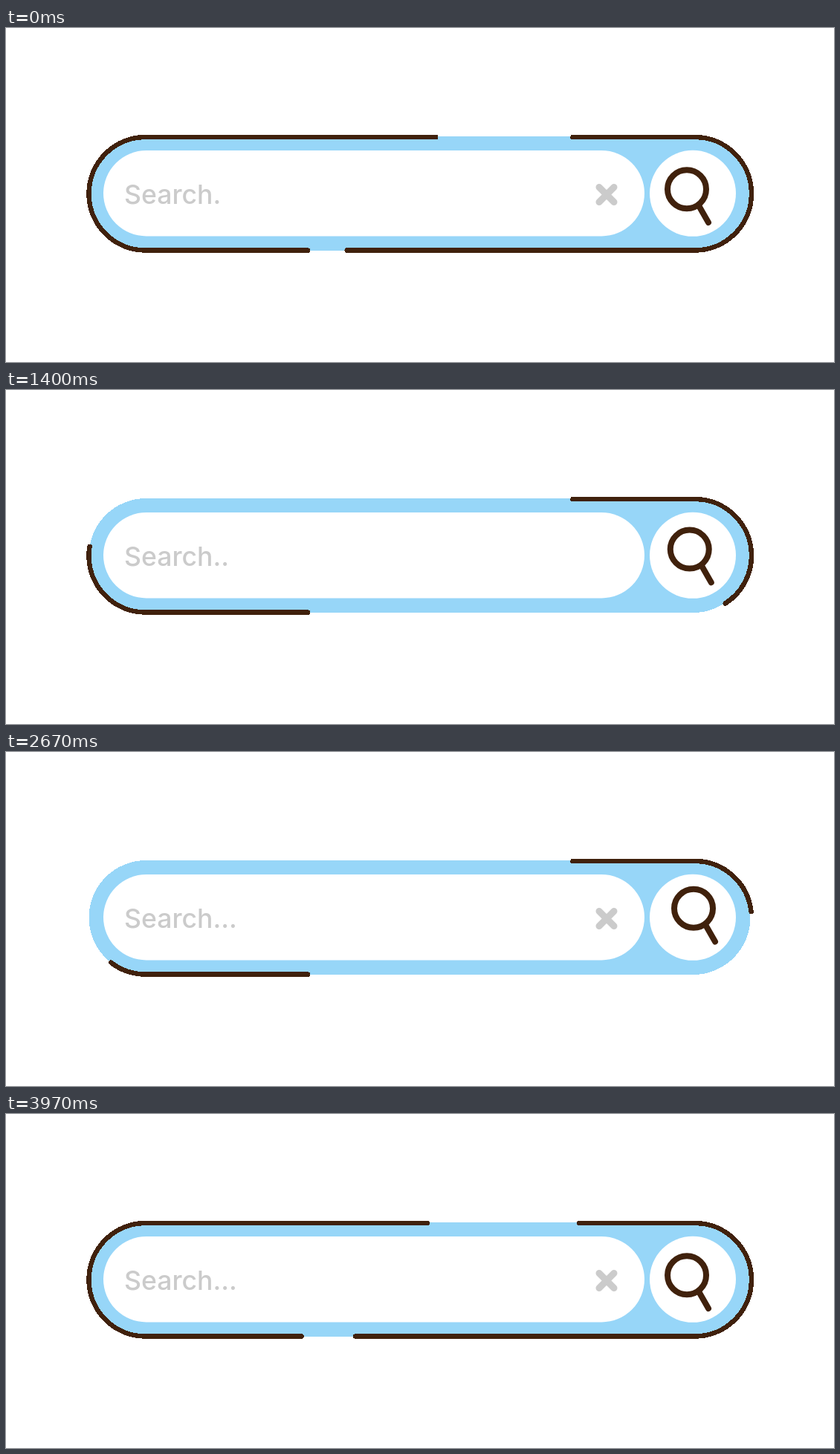
Recreate the animation shown at these times as an HTML page. Size 1114 px wide and 450 px high, loop 4010 ms.

```html
<!DOCTYPE html>
<html lang="en">
<head>
<meta charset="utf-8">
<title>Search bar</title>
<style>
  html, body { margin: 0; height: 100%; overflow: hidden; background: #fff; }
  svg { display: block; }
  text { font: 500 35.6px Inter, sans-serif; fill: #cbcbcb; }
  .ink { fill: none; stroke: #40210c; stroke-linecap: round; }
  .crisp { shape-rendering: crispEdges; }
</style>
</head>
<body>
<svg width="1114" height="450" viewBox="0 0 1114 450">
  <rect class="crisp" x="111.5" y="146" width="890" height="154" rx="77" fill="#97d6f8"/>
  <rect x="131" y="165" width="728" height="115.5" rx="57.75" fill="#fff"/>
  <circle cx="924" cy="222.8" r="58" fill="#fff"/>
  <text id="label" x="159" y="237"></text>
  <path id="cross" d="M798 214.5l20 20m0-20l-20 20" stroke="#cbcbcb" stroke-width="9" stroke-linecap="round"/>
  <g id="lens" class="ink">
    <circle cx="916" cy="217.3" r="26" stroke-width="8"/>
    <path d="M933 241L945 262" stroke-width="8"/>
  </g>
  <g class="ink crisp" stroke-width="6.5">
    <path id="right" d="M762.5 147H926.75a76.25 76.25 0 0 1 0 152.5H400"/>
    <path id="left" d="M406 299.5H187.75a76.25 76.25 0 0 1 0-152.5H700"/>
  </g>
</svg>
<script>
const LOOP = 4010, FRAME = 100 / 3, LAST = 119;
const LEFT_SCALE = 0.973; // the left line is slightly shorter
const get = id => document.getElementById(id);
const label = get('label'), cross = get('cross'), lens = get('lens');
const right = get('right'), left = get('left');

// Progress from 0 to 1 between times a and b, plain and eased
const ramp = (a, b, t) => Math.max(0, Math.min(1, (t - a) / (b - a)));
const smooth = (a, b, t) => {
  const u = ramp(a, b, t);
  return u * u * (3 - 2 * u);
};
const cubic = (a, b, t) => {
  const u = ramp(a, b, t);
  return u < 0.5 ? 4 * u ** 3 : 1 - 4 * (1 - u) ** 3;
};

// Both ends of an outline line, in px along its path
const lineEnd = t => 871.5 - 828.5 * cubic(458, 2194, t) + 817 * cubic(1900, 3750, t);
const lineStart = t =>
  14 * (smooth(1450, 2250, t) - smooth(2250, 2650, t)) + 8.5 * smooth(2950, 3650, t);

const lensShift = t => 9.3 * (smooth(550, 2500, t) - ramp(2400, 3970, t) ** 2);

function trim(path, start, end) {
  path.setAttribute('stroke-dasharray', `${end - start} 9999`);
  path.setAttribute('stroke-dashoffset', -start);
}

function draw(now) {
  const frame = Math.min(LAST, Math.floor((now % LOOP + 3.4) / FRAME));
  const t = frame * FRAME, beat = frame % 30;
  const start = lineStart(t), end = lineEnd(t), x = lensShift(t);
  trim(right, start, end);
  trim(left, start * LEFT_SCALE, end * LEFT_SCALE);
  lens.setAttribute('transform', `translate(${x} ${-0.72 * x})`);
  cross.setAttribute('opacity', 1 - smooth(3.1, 7.4, beat) + smooth(13.1, 17.4, beat));
  label.textContent = 'Search' + '.'.repeat(Math.min(3, 1 + Math.floor(frame / 30)));
}

const begin = performance.now();
function tick() {
  draw(performance.now() - begin);
  requestAnimationFrame(tick);
}
tick();
</script>
</body>
</html>
```
